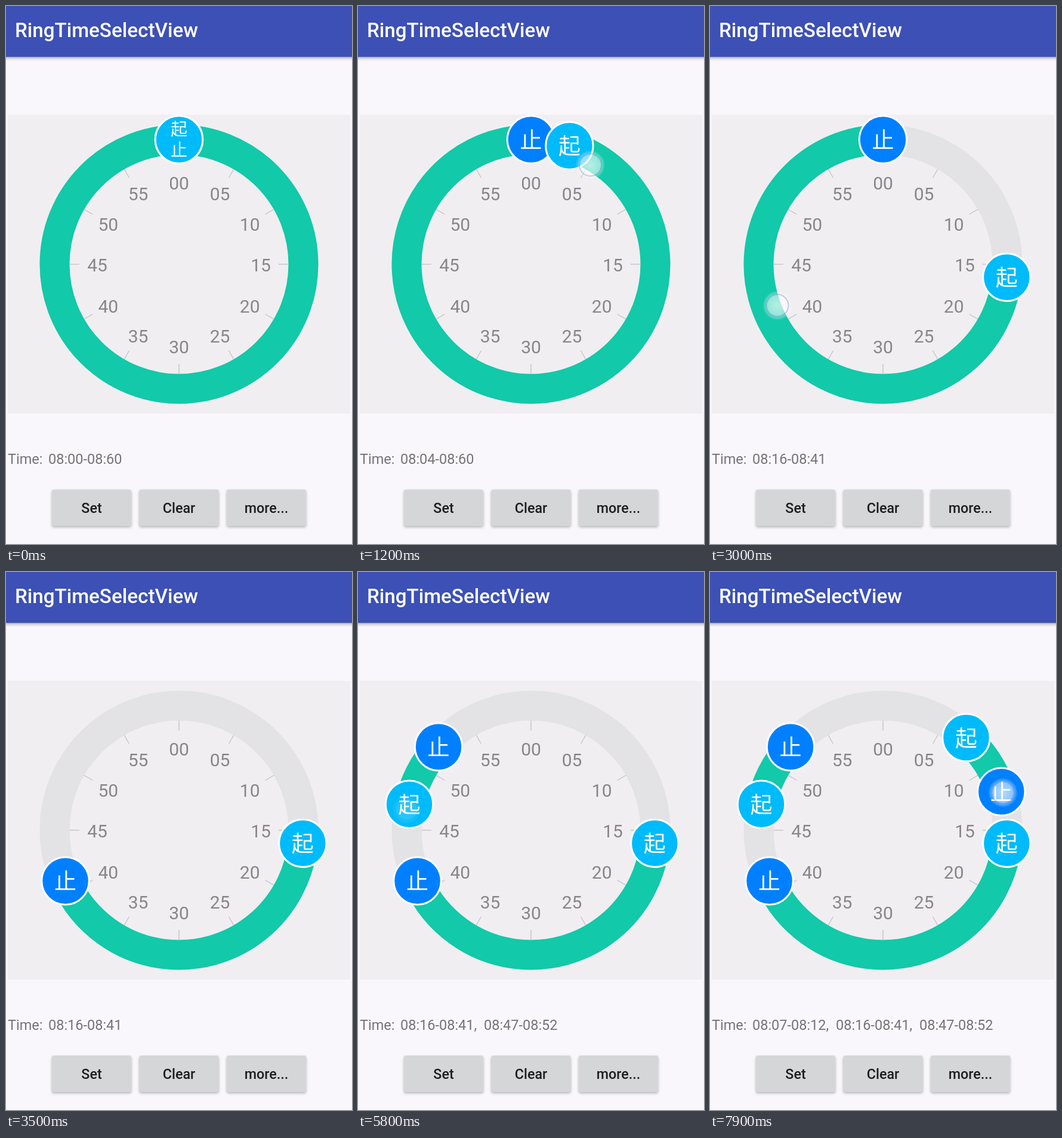
Write an HTML page that moves like this. It is 580 px wide and 900 px high and loops after 8 s.

```html
<!DOCTYPE html>
<html lang="zh-CN">
<head>
<meta charset="utf-8">
<title>RingTimeSelectView</title>
<style>
  html, body { margin: 0; width: 100%; height: 100%; overflow: hidden; background: #f9f7fb; }
  svg { display: block; width: 580px; height: 900px; font-family: Roboto, "Noto Sans", sans-serif; }
  .title { font-size: 33.2px; font-weight: 500; fill: #fff; }
  .time { font-size: 23.5px; fill: #747376; }
  .button rect { fill: #d5d6d8; filter: drop-shadow(0 2px 2px rgba(0, 0, 0, .28)); }
  .button text { font-size: 23.3px; font-weight: 500; fill: #1d1d1e; text-anchor: middle; }
  .hours { font-size: 30px; fill: #87868a; text-anchor: middle; }
  .ticks { stroke: #b2b1b4; stroke-width: 1; }
  .ring { fill: none; stroke: #e3e2e4; stroke-width: 50; }
  .arc { stroke: #12c9a9; }
  .knob circle { stroke: #fff; stroke-width: 3; }
  .knob text { font: 37px "Noto Sans CJK SC", "Noto Sans CJK", sans-serif; fill: #fff; text-anchor: middle; }
  .knob .small { font-size: 28px; }
</style>
</head>
<body>
<svg viewBox="0 0 580 900">
  <defs>
    <linearGradient id="shade" x2="0" y2="1">
      <stop offset="0" stop-color="#000" stop-opacity=".34"/>
      <stop offset=".4" stop-color="#000" stop-opacity=".12"/>
      <stop offset="1" stop-color="#000" stop-opacity="0"/>
    </linearGradient>
    <radialGradient id="glow">
      <stop offset="0" stop-color="#fff" stop-opacity=".7"/>
      <stop offset=".68" stop-color="#fff" stop-opacity=".55"/>
      <stop offset=".8" stop-color="#fff" stop-opacity=".3"/>
      <stop offset="1" stop-color="#fff" stop-opacity="0"/>
    </radialGradient>
  </defs>
  <rect width="580" height="900" fill="#f9f7fb"/>
  <rect y="85" width="580" height="7" fill="url(#shade)"/>
  <rect width="580" height="85" fill="#3c50b5"/>
  <text class="title" x="15" y="52">RingTimeSelectView</text>
  <rect x="3" y="182" width="574" height="500" fill="#f0eef1"/>
  <circle class="ring" cx="290" cy="432" r="208.5"/>
  <g id="arcs"></g>
  <g class="ticks" id="ticks"></g>
  <g class="hours" id="hours"></g>
  <g id="knobs"></g>
  <text class="time" y="766"><tspan x="3">Time:</tspan><tspan class="range" x="71"></tspan><tspan class="range" x="211"></tspan><tspan class="range" x="351"></tspan></text>
  <g id="buttons"></g>
  <g id="touch">
    <circle r="25" fill="url(#glow)"/>
    <circle r="18.5" fill="none" stroke="#7080c8" stroke-opacity=".38" stroke-width="2"/>
  </g>
</svg>
<script>
  const LOOP = 8000, STEP = 100, CX = 290, CY = 432, R = 208.5;
  const $ = id => document.getElementById(id);
  const ranges = document.querySelectorAll('.range');

  function add(parent, tag, attrs, text) {
    const el = document.createElementNS('http://www.w3.org/2000/svg', tag);
    for (const key in attrs) el.setAttribute(key, attrs[key]);
    if (text) el.textContent = text;
    parent.appendChild(el);
    return el;
  }

  function polar(minute, radius) {
    const a = minute * Math.PI / 30;
    return [CX + radius * Math.sin(a), CY - radius * Math.cos(a)];
  }

  const two = n => String(n).padStart(2, '0');
  const show = (el, on) => el.setAttribute('visibility', on ? 'inherit' : 'hidden');
  const move = (el, [x, y]) => el.setAttribute('transform', `translate(${x} ${y})`);

  for (let m = 0; m < 60; m += 5) {
    const [x1, y1] = polar(m, 183.5), [x2, y2] = polar(m, 167), [x, y] = polar(m, 137);
    add($('ticks'), 'line', { x1, y1, x2, y2 });
    add($('hours'), 'text', { x, y: y + 12 }, two(m));
  }

  ['Set', 'Clear', 'more...'].forEach((label, i) => {
    const g = add($('buttons'), 'g', { class: 'button' });
    const x = 143.5 + 146.5 * i;
    add(g, 'rect', { x: x - 66.5, y: 809, width: 133, height: 61, rx: 3 });
    add(g, 'text', { x, y: 848 }, label);
  });

  function makeKnob(label, fill) {
    const g = add($('knobs'), 'g', { class: 'knob' });
    add(g, 'circle', { r: 39.75, fill });
    const text = add(g, 'text', { y: 14.5 }, label);
    return { g, text };
  }

  const segments = [0, 1, 2].map(() => {
    const arc = add($('arcs'), 'circle', { class: 'ring arc', cx: CX, cy: CY, r: R, pathLength: 60 });
    const stop = makeKnob('止', '#0080ff');
    const start = makeKnob('起', '#00bbf9');
    const both = add(start.g, 'g', {});
    add(both, 'text', { class: 'small', y: -8 }, '起');
    add(both, 'text', { class: 'small', y: 27.5 }, '止');
    return { arc, stop, start, both };
  });

  function drawSegment({ arc, stop, start, both }, range) {
    [arc, stop.g, start.g].forEach(el => show(el, range));
    if (!range) return;
    const [from, to] = range, joined = from % 60 === to % 60;
    arc.setAttribute('stroke-dasharray', joined ? 'none' : `${to - from} 60`);
    arc.setAttribute('transform', `rotate(${from * 6 - 90} ${CX} ${CY})`);
    move(start.g, polar(from, R));
    move(stop.g, polar(to, R));
    show(start.text, !joined);
    show(both, joined);
  }

  // Finger position in minutes, one value per step from 800 ms
  const path = [.2, .6, 1.7, 3.2, 5.16, 8.2, 11.8, 14.8, 15.6, 16.1];
  const finger = t => path[Math.max(0, Math.min(path.length - 1, (t - 800) / STEP))];

  // [from, to, x, y]
  const taps = [
    [3000, 3500, 113, 501],
    [5200, 5900, 81.5, 397],
    [6800, 7400, 425, 276],
    [7800, 8400, 491, 369]
  ];

  function touchAt(t) {
    if (t >= 800 && t < 2000) return [800, 2000, ...polar(finger(t), 193.5)];
    return taps.find(([a, b]) => t >= a && t < b);
  }

  function render(now) {
    const t = Math.floor(now % LOOP / STEP) * STEP;
    const from = Math.round(finger(t - STEP));
    const fromLabel = Math.floor((finger(t) + finger(t - STEP)) / 2);
    const early = t >= 6800 && [7, 12], late = t >= 5300 && [47, 52];

    drawSegment(segments[0], early);
    drawSegment(segments[1], [from, t > 3000 ? 41 : 60]);
    drawSegment(segments[2], late);

    const list = [early, [fromLabel, t >= 3000 ? 41 : 60], late].filter(Boolean);
    ranges.forEach((el, i) => {
      const r = list[i];
      el.textContent = r ? `08:${two(r[0])}-08:${two(r[1])}${i < list.length - 1 ? ',' : ''}` : '';
    });

    const touch = touchAt(t);
    show($('touch'), touch);
    if (touch) {
      move($('touch'), touch.slice(2));
      $('touch').setAttribute('opacity', Math.min(1, (touch[1] - t) / 400));
    }
  }

  function frame() {
    render(performance.now());
    requestAnimationFrame(frame);
  }
  frame();
</script>
</body>
</html>
```
